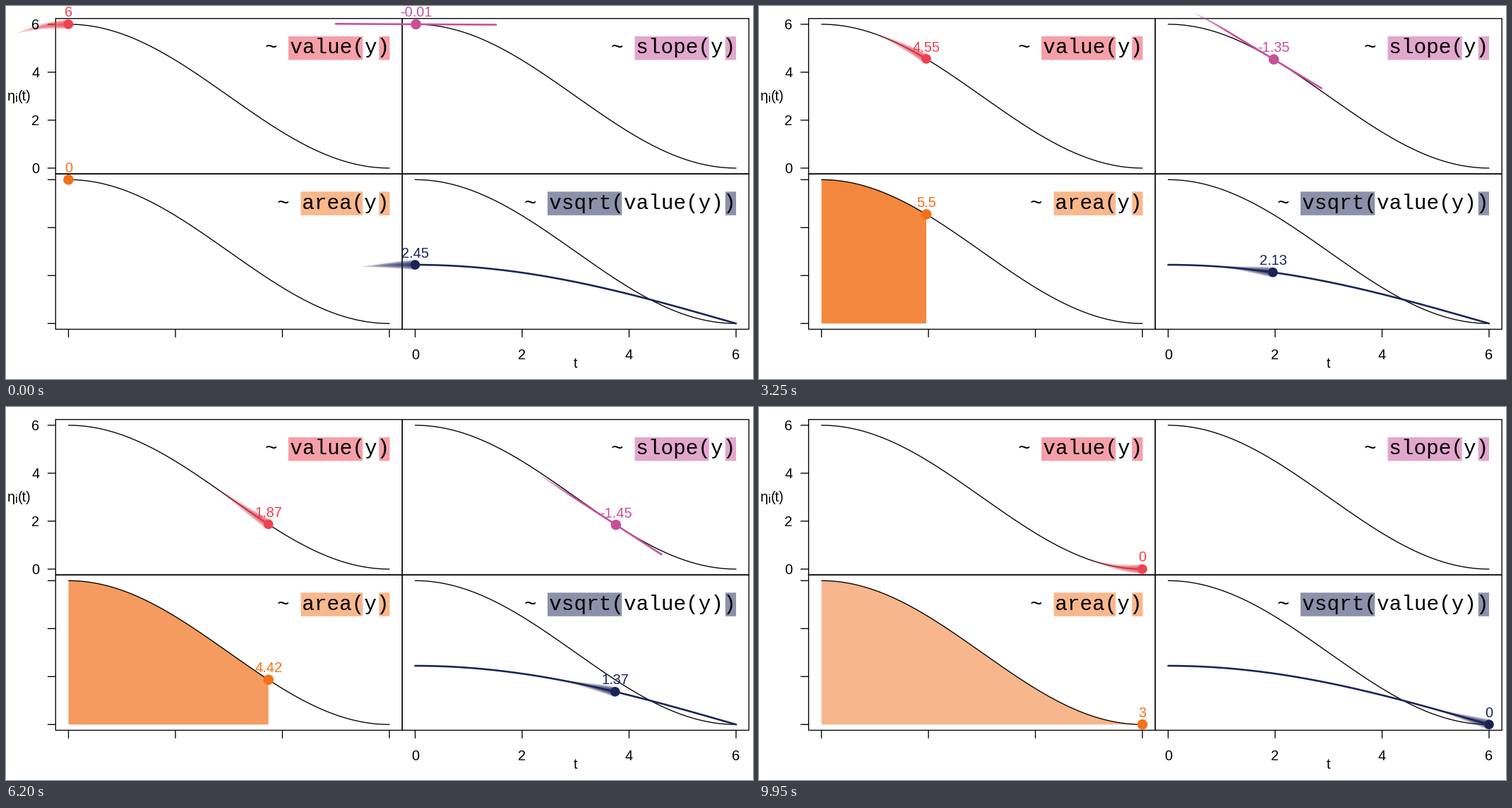
A matplotlib script that plays this animation: 1058x529 px, repeating every 10000 ms.

```python
import numpy as np
import matplotlib.pyplot as plt
from matplotlib.animation import FuncAnimation
from matplotlib.collections import LineCollection
from matplotlib.colors import to_rgba
from matplotlib.patches import Circle, Polygon, Rectangle

W, H, DPI = 1058, 529, 100
FRAMES, INTERVAL = 200, 50
PT = 72 / DPI                      # one pixel in points
STEP = 6 / (FRAMES - 1)
UX, UY = 75.75, 34.0               # pixels per data unit
LEFT, RIGHT = 88.5, 579.5          # pixel x of t = 0
TOP, BOTTOM = 229.9, 450.3         # pixel y of value = 0
PAD = 0.24                         # panel margin in data units
RED, PINK, ORANGE, NAVY = "#ee4152", "#c6509c", "#f4711a", "#192456"
FILL = "#f16f18"

fig = plt.figure(figsize=(W / DPI, H / DPI), dpi=DPI, facecolor="white")
ax = fig.add_axes([0, 0, 1, 1])
ax.set_xlim(0, W)
ax.set_ylim(H, 0)
ax.axis("off")


def eta(t):
    return 3 * (1 + np.cos(np.pi * t / 6))


def root(t):
    return np.sqrt(np.maximum(eta(t), 0))


def mean_area(t):
    return 3 + 18 / np.pi * np.sin(np.pi * t / 6) / t if t > 0 else 0


def fmt(v):
    s = f"{v:.2f}".rstrip("0").rstrip(".")
    return "0" if s == "-0" else s


def stroke(xs, ys, color="black", width=1.35, z=2):
    return ax.plot(xs, ys, color=color, lw=width * PT, zorder=z,
                   solid_capstyle="round", snap=False)[0]


def write(x, y, s, size=20, color="black", ha="center",
          font="Liberation Sans", z=8):
    return ax.text(x, y, s, fontsize=size * PT, color=color, ha=ha,
                   va="baseline", family=font, zorder=z)


class Wake:
    """Nested translucent strokes: the longer, the thinner."""

    def __init__(self, color, wide, thin, alpha, n=24):
        self.part = np.arange(1, n + 1) / n
        widths = (wide + (thin - wide) * self.part) * PT
        self.lines = LineCollection([], linewidths=widths, zorder=4,
                                    colors=[to_rgba(color, alpha)],
                                    capstyle="butt")
        ax.add_collection(self.lines)

    def follow(self, path, length):
        if length <= 0:
            self.lines.set_segments([])
            return
        back = [np.linspace(0, length * p, 16) for p in self.part]
        self.lines.set_segments([np.column_stack(path(b)) for b in back])


class Marker:
    """A dot with its value above it."""

    def __init__(self, color, radius):
        self.dot = ax.add_patch(Circle((0, 0), radius, color=color, lw=0,
                                       zorder=6))
        self.label = write(0, 0, "", color=color)

    def place(self, x, y, value):
        self.dot.center = (x, y)
        self.label.set_position((x, y - 10.5))
        self.label.set_text(fmt(value))

    def show(self, on):
        self.dot.set_visible(on)
        self.label.set_visible(on)


def title(right, top, name, inner, color):
    full = f"~ {name}({inner})"
    pitch = 17.64
    start = right - pitch * (len(name) + len(inner) + 2) - 2.4
    end = right - pitch * (len(inner) + 1) - 0.2
    for x0, x1 in ((start, end - 2.8), (right - 15.2, right)):
        ax.add_patch(Rectangle((x0, top), x1 - x0, 33.5, color=color,
                               alpha=0.5, lw=0, zorder=3, snap=False))
    write(right - 0.5, top + 24.3, full, pitch / 0.6, ha="right",
          font="Liberation Mono")


# Frames, ticks and labels
for left in (LEFT, RIGHT):
    x0, x1 = left - PAD * UX, left + (6 + PAD) * UX
    for base in (TOP, BOTTOM):
        y0, y1 = base - (6 + PAD) * UY, base + PAD * UY
        stroke([x0, x1, x1, x0, x0], [y0, y0, y1, y1, y0])
edge_x, edge_y = LEFT - PAD * UX, BOTTOM + PAD * UY
for v in (0, 2, 4, 6):
    for base in (TOP, BOTTOM):
        stroke([edge_x - 11, edge_x], [base - v * UY] * 2)
    for base in (LEFT, RIGHT):
        stroke([base + v * UX] * 2, [edge_y, edge_y + 11])
    write(47.5, TOP - v * UY + 7, str(v), ha="right")
    write(RIGHT + v * UX, 501, str(v))
write(806.5, 513, "t")
write(1.5, 134, "η", ha="left")
write(12.8, 135.5, "i", 17, ha="left")
write(16.5, 134, "(t)", ha="left")

# Fixed curves
ts = np.linspace(0, 6, 200)
for x0 in (LEFT, RIGHT):
    for y0 in (TOP, BOTTOM):
        stroke(x0 + ts * UX, y0 - eta(ts) * UY)
stroke(RIGHT + ts * UX, BOTTOM - root(ts) * UY, NAVY, 2.6, z=5)

title(543.5, 43, "value", "y", RED)
title(1034, 43, "slope", "y", PINK)
title(543.5, 263.3, "area", "y", ORANGE)
title(1034, 263.3, "vsqrt", "value(y)", NAVY)

# Moving parts
value_mark, root_mark = Marker(RED, 6.8), Marker(NAVY, 6.8)
slope_mark, area_mark = Marker(PINK, 7.3), Marker(ORANGE, 7.3)
value_wake = Wake(RED, 15.5, 1, 0.08)
root_wake = Wake(NAVY, 15.5, 1, 0.08)
slope_wake = Wake(PINK, 2.8, 1.6, 0.08)
tangent = stroke([], [], PINK, 2.6, z=5)
area = ax.add_patch(Polygon([[0, 0]] * 3, color=FILL, lw=0, zorder=1,
                            snap=False))


def draw_slope(i):
    on = i < FRAMES - 1
    slope_mark.show(on)
    tangent.set_visible(on)
    if not on:
        slope_wake.follow(None, 0)
        return
    t0, t1 = i * STEP, (i + 1) * STEP
    m = (eta(t1) - eta(t0)) / STEP
    t, y = (t0 + t1) / 2, (eta(t0) + eta(t1)) / 2
    dx = 1.5 / np.hypot(1, m)
    ends = np.array([-dx, dx])
    tangent.set_data(RIGHT + (t + ends) * UX, TOP - (y + m * ends) * UY)
    slope_mark.place(RIGHT + t * UX, TOP - y * UY, m)
    slope_wake.follow(lambda s: (RIGHT + (t - dx - s) * UX,
                                 TOP - (eta(t - s) - m * dx) * UY),
                      min(0.6, t0))


def update(i):
    t = i * STEP
    y = eta(t)
    value_mark.place(LEFT + t * UX, TOP - y * UY, y)
    value_wake.follow(lambda s: (LEFT + (t - s) * UX,
                                 TOP - eta(t - s) * UY), 1)

    root_mark.place(RIGHT + t * UX, BOTTOM - root(t) * UY, root(t))
    root_wake.follow(lambda s: (RIGHT + (t - s) * UX,
                                BOTTOM - root(t - s) * UY), 1)

    area_mark.place(LEFT + t * UX, BOTTOM - y * UY, mean_area(t))
    u = np.linspace(0, t, 120)
    edge = np.column_stack((LEFT + u * UX, BOTTOM - eta(u) * UY))
    area.set_xy(np.vstack(([LEFT, BOTTOM], edge,
                           [LEFT + t * UX, BOTTOM])))
    area.set_alpha(1 - 0.5 * i / (FRAMES - 1))

    draw_slope(i)
    return []


anim = FuncAnimation(fig, update, frames=FRAMES, interval=INTERVAL,
                     init_func=lambda: update(0), repeat=True,
                     repeat_delay=0, blit=False)
plt.show()
```
